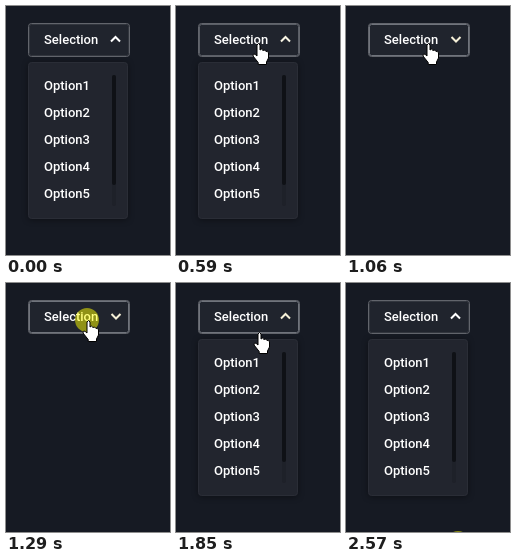
An HTML page for the animation above (2.63 s loop, 164 by 249 pixels).

```html
<!DOCTYPE html>
<html lang="en">
<head>
<meta charset="utf-8">
<title>Dropdown</title>
<style>
  html, body { margin: 0; height: 100%; overflow: hidden; background: #161a23; }
  svg { display: block; width: 100vw; height: 100vh; }
  text { font: 500 13px Roboto, Arial, sans-serif; fill: #fff; }
  #list { filter: drop-shadow(0 1px 3px rgba(0, 0, 0, .4)); }
  .cursor { fill: #fff; stroke: #000; stroke-linejoin: round; }
</style>
</head>
<body>
<svg viewBox="0 0 164 249">
  <rect x="22.5" y="17.5" width="101" height="33" rx="3" fill="#20242d" stroke="#62656c"/>
  <rect id="border" x="23.5" y="18.5" width="99" height="31" rx="2" fill="#20242d"/>
  <text x="38" y="38">Selection</text>
  <path id="chevron" fill="none" stroke-width="2"/>
  <g id="list">
    <rect x="22.5" y="56.5" width="99" height="156" rx="3" fill="#22252e" stroke="#2a2d36"/>
    <rect x="106" y="69" width="4" height="131" rx="2" fill="#1e2129"/>
    <rect x="106" y="69" width="4" height="110" rx="2" fill="#0f1116"/>
    <g id="options"></g>
  </g>
  <circle id="click" r="12" fill="#ff0" fill-opacity=".5"/>
  <path id="hand" class="cursor" d="M0 13V2Q1.5 -1 3 2V7Q4.5 5 6 7.5Q7.5 6 9 8.5Q11 7 11.5 10V15L9.5 19V21.5H1.2V19.5L-4 13Q-4 9 0 13Z"/>
  <path id="arrow" class="cursor" d="M.5 .5V16.5L4.2 13L6.6 18.7L9 17.7L6.6 12.2H11.5Z"/>
</svg>
<script>
const LOOP = 2630;
const $ = id => document.getElementById(id);

// time, x, y
const moves = [
  [0, 112, 260], [130, 110, 244], [210, 102, 203], [290, 93, 144],
  [370, 86, 91], [440, 83, 64], [510, 81, 45], [590, 81, 37], [670, 81, 37],
  [1850, 82, 49], [1930, 84, 91], [2010, 88, 156], [2080, 93, 224],
  [2160, 101, 244], [2230, 112, 260]
];
const fades = [[0, 1], [980, .4], [1060, 0], [1460, .5], [1530, 1]];
const clicks = [[830, 910], [1290, 1460], [2570, LOOP]];

const at = (table, t) => table.filter(row => row[0] <= t).pop();
const within = (t, [from, to]) => t >= from && t < to;
const clamp = v => Math.max(0, Math.min(1, v));
const mix = (a, b, k) => `rgb(${a.map((v, i) => Math.round(v + (b[i] - v) * k))})`;
const show = (id, on) => $(id).setAttribute('visibility', on ? 'visible' : 'hidden');

const rowTop = i => 69 + 27 * i;
$('options').innerHTML = Array.from({ length: 5 }, (_, i) =>
  `<rect x="28" y="${rowTop(i)}" width="73" height="23" rx="3" fill="#2b2e38"/>
   <text x="38" y="${rowTop(i) + 15}">Option${i + 1}</text>`).join('');
const rows = [...$('options').querySelectorAll('rect')];

function draw(t) {
  const [moved, x, y] = at(moves, t);
  const hover = clamp(Math.min((moved - 430) / 240, (2010 - moved) / 160));
  const open = !within(t, [910, 1460]);

  $('border').setAttribute('stroke', mix([50, 54, 62], [112, 116, 124], hover));
  $('chevron').setAttribute('d', open ? 'M105 35.5l4.5 -4.5l4.5 4.5' : 'M105.5 31l4.5 4.5l4.5 -4.5');
  $('chevron').setAttribute('stroke', mix([255, 255, 255], [245, 240, 215], hover));
  $('list').setAttribute('opacity', at(fades, t)[1]);

  const active = rows.findIndex((_, i) => within(y, [rowTop(i), rowTop(i) + 23]));
  rows.forEach((row, i) => row.setAttribute('opacity', i === active ? 1 : 0));

  const pointing = active >= 0 || within(y, [17, 51]);
  for (const id of ['hand', 'arrow', 'click']) $(id).setAttribute('transform', `translate(${x} ${y})`);
  show('hand', pointing);
  show('arrow', !pointing);
  show('click', clicks.some(span => within(t, span)));
}

const start = performance.now();
function tick() {
  draw((performance.now() - start) % LOOP);
  requestAnimationFrame(tick);
}
tick();
</script>
</body>
</html>
```
